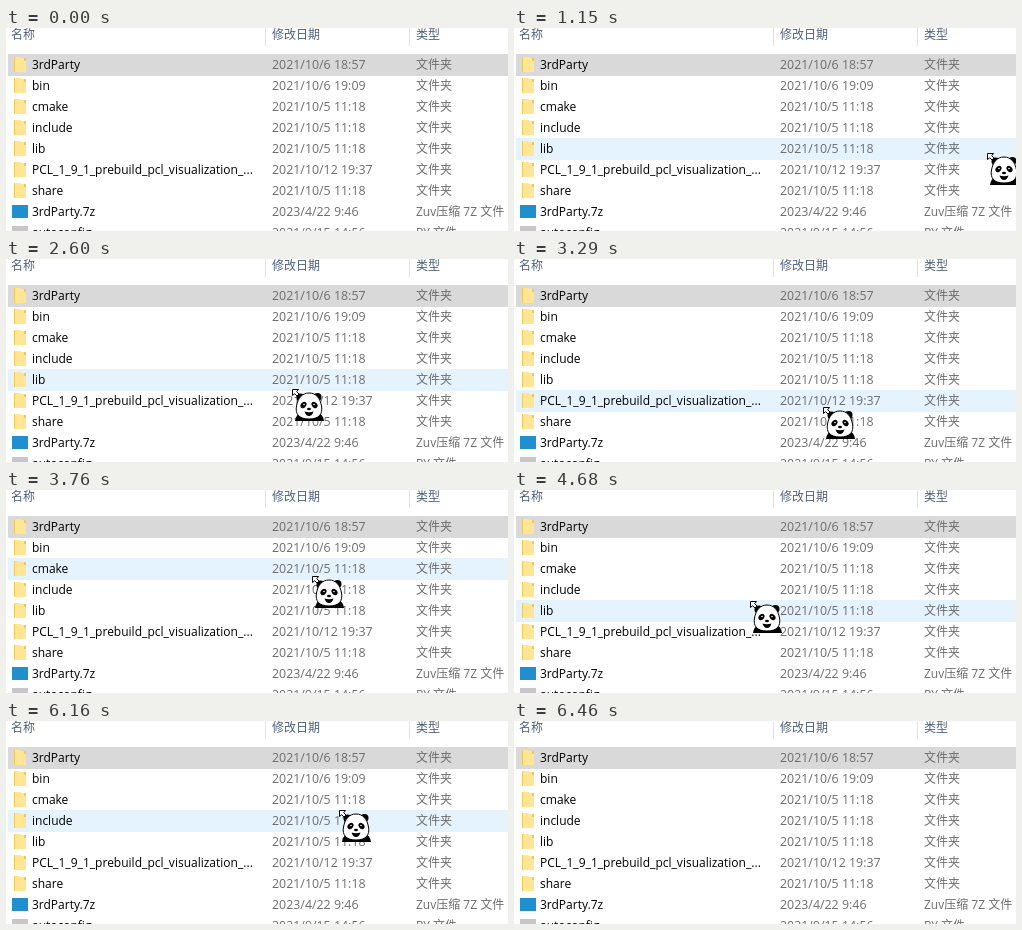
An HTML page for the animation above (8 s loop, 502 by 203 pixels).

```html
<!DOCTYPE html>
<html lang="zh-CN">
<meta charset="utf-8">
<style>
  html, body { margin: 0; width: 100%; height: 100%; overflow: hidden; background: #fff; }
  svg { display: block; font: 12px "Open Sans", "Noto Sans", "Noto Sans CJK SC", "Noto Sans CJK", sans-serif; }
  .head { fill: #4c607a; }
  .date { font-size: 12.4px; }
  .date, .type { fill: #6d6d6d; }
</style>
<body>
<svg width="502" height="203" viewBox="0 0 502 203">
  <defs>
    <g id="folder">
      <path d="M8 29h7v1h5v14H8z" fill="#ffe594"/>
      <path d="M8 29h1v15H8zM18 30h2v3h-2z" fill="#f0c85a"/>
    </g>
  </defs>
  <path d="M259.500 0v18M403.500 0v18" stroke="#e3e3e3"/>
  <g class="head">
    <text x="5" y="10.500">名称</text>
    <text x="266" y="10.500">修改日期</text>
    <text x="410" y="10.500">类型</text>
  </g>
  <rect x="2" y="26" width="500" height="22" fill="#d9d9d9"/>
  <rect id="hover" x="2" width="500" height="22"/>
  <g id="rows"></g>
  <g id="cursor">
    <path d="M2 32Q3 25 8 24H25Q30 25 31 32z"/>
    <circle cx="7.500" cy="8.500" r="4"/>
    <circle cx="24.500" cy="8" r="4"/>
    <path d="M16 4C23 4 27 9 28.500 17C30 25 26 30 16 30C6 30 2 25 3.500 17C5 9 9 4 16 4Z" fill="#fff" stroke="#000"/>
    <ellipse cx="10.500" cy="16" rx="2.600" ry="3.500" transform="rotate(40 10.500 16)"/>
    <ellipse cx="21.500" cy="16" rx="2.600" ry="3.500" transform="rotate(-40 21.500 16)"/>
    <g fill="#fff">
      <circle cx="11" cy="15.500" r=".8"/>
      <circle cx="21" cy="15.500" r=".8"/>
    </g>
    <ellipse cx="16" cy="20" rx="2" ry="1.200"/>
    <path d="M11.500 22.500q4.500 1.500 9 0q-1.500 4.500-4.500 4.500t-4.500-4.500z"/>
    <path d="M-.5 .5h6L3.700 2.700L6 5L4 7L1.700 4.700L-.5 6.500z" fill="#fff" stroke="#000"/>
  </g>
</svg>
<script>
const LOOP = 8000, TICK = 77, PHASE = 46;
const TOP = 26, ROW = 21, WIDTH = 502, HEIGHT = 203;

const files = [
  ['3rdParty', '2021/10/6 18:57'],
  ['bin', '2021/10/6 19:09'],
  ['cmake', '2021/10/5 11:18'],
  ['include', '2021/10/5 11:18'],
  ['lib', '2021/10/5 11:18'],
  ['PCL_1_9_1_prebuild_pcl_visualization_...', '2021/10/12 19:37'],
  ['share', '2021/10/5 11:18'],
  ['3rdParty.7z', '2023/4/22 9:46', 'Zuv压缩 7Z 文件', '#1f8fcf'],
  ['autoconfig', '2021/9/15 14:56', 'PY 文件', '#c9c5ca'],
];

// Pointer key points: tick, x, y.
const path = [
  [2, 470, 210], [3, 455, 190], [12, 450, 188], [17, 510, 30], [18, 510, -40],
  [21, 266, -40], [22, 266, -23], [28, 280, 93], [32, 284, 84],
  [33, 287, 130], [34, 296, 171], [36, 308, 146], [42, 310, 148],
  [47, 306, 80], [54, 312, 121], [58, 262, 122], [60, 237, 111],
  [63, 194, -14], [74, 314, -12], [79, 334, 89], [83, 340, 210],
];

const byId = id => document.getElementById(id);
const hover = byId('hover'), cursor = byId('cursor');

byId('rows').innerHTML = files.map(([name, date, type = '文件夹', color], i) => `
  <g transform="translate(0 ${i * ROW})">
    ${color ? `<rect x="6" y="30" width="16" height="13" fill="${color}"/>` : '<use href="#folder"/>'}
    <text x="26" y="41">${name}</text>
    <text class="date" x="266" y="41">${date}</text>
    <text class="type" x="410" y="41">${type}</text>
  </g>`).join('');

function pointerAt(tick) {
  const next = path.findIndex(key => key[0] > tick);
  if (next < 1) return path.at(next).slice(1);
  const [t0, x0, y0] = path[next - 1], [t1, x1, y1] = path[next];
  const u = (tick - t0) / (t1 - t0);
  return [x0 + (x1 - x0) * u, y0 + (y1 - y0) * u].map(Math.round);
}

function draw() {
  const tick = Math.floor((performance.now() % LOOP - PHASE) / TICK);
  const [x, y] = pointerAt(tick);
  const row = Math.floor((y - TOP) / ROW);
  const inside = row >= 0 && x < WIDTH && y < HEIGHT;
  cursor.setAttribute('transform', `translate(${x} ${y})`);
  hover.setAttribute('y', TOP + row * ROW);
  hover.setAttribute('fill', !inside ? 'none' : row ? '#e5f3ff' : '#cce8ff');
  requestAnimationFrame(draw);
}
draw();
</script>
</body>
</html>
```
